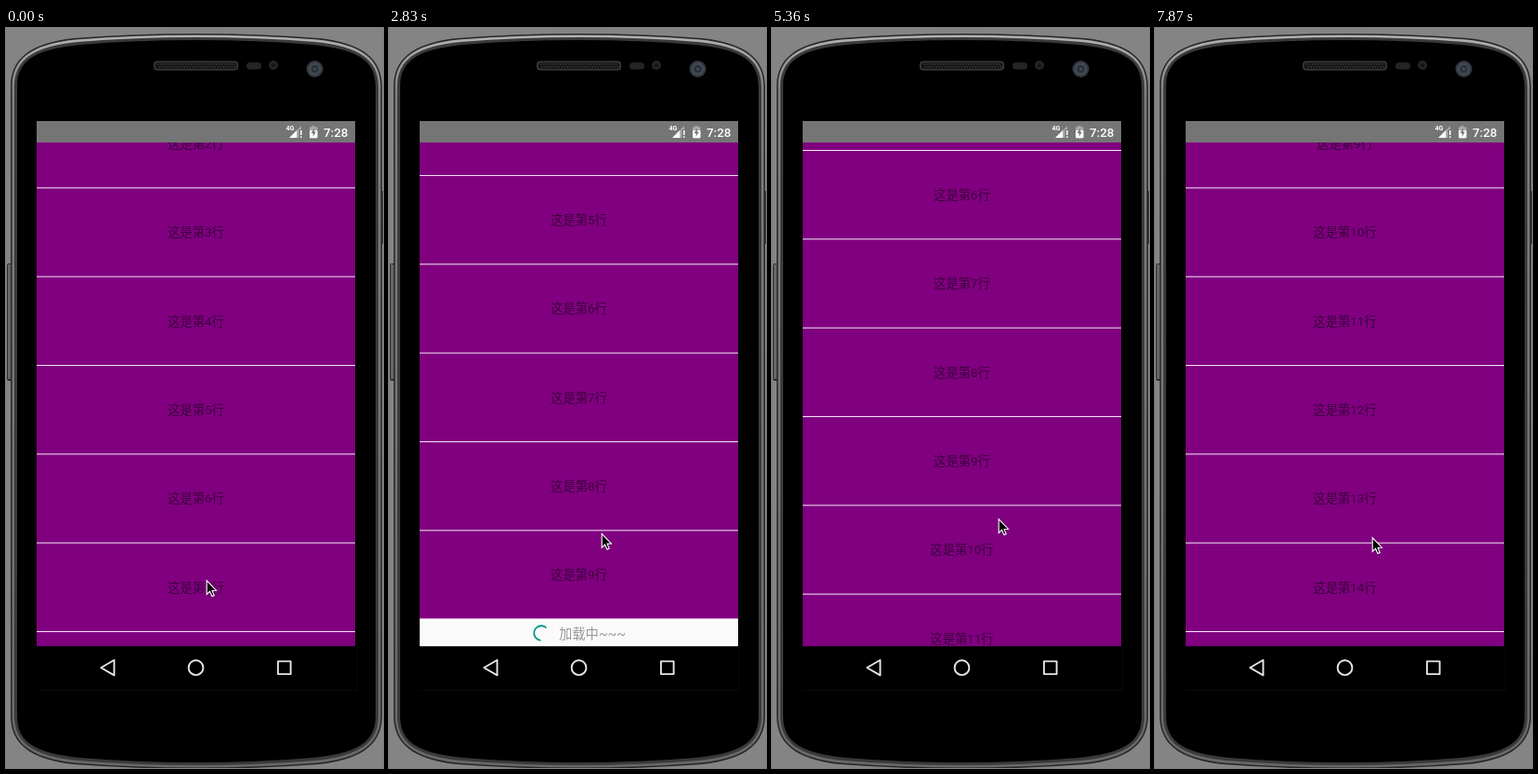
Recreate the animation shown at these times as an HTML page with a canvas. Size 406 px wide and 795 px high, loop 8000 ms.

```html
<!DOCTYPE html>
<html lang="zh">
<head>
<meta charset="utf-8">
<title>List</title>
<style>
html, body { margin: 0; width: 100%; height: 100%; overflow: hidden; background: #848484; }
canvas { display: block; width: 406px; height: 795px; }
</style>
</head>
<body>
<canvas id="stage" width="406" height="795"></canvas>
<script>
const ctx = document.getElementById('stage').getContext('2d');
const LOOP = 8000, TICK = 148.3;
const ROW = 286 / 3, FIRST_LINE = 171.3;
const LOADING = 8, LOADED = 25;
const FONT = 'Roboto, "Noto Sans CJK SC", "Noto Sans CJK", sans-serif';

// Each pointer move eases out; swipes also scroll the list.
const MOVES = [
  { at: 1, ticks: 3, dx: 10, dy: -143, scroll: 150 },
  { at: 4, ticks: 1, dx: 2, dy: 110 },
  { at: 6, ticks: 2, dx: 1, dy: -84, scroll: 54 },
  { at: 8, ticks: 6, dy: 48 },
  { at: 14, ticks: 11, dy: 24 },
  { at: 26, ticks: 2, dy: 34 },
  { at: 29, ticks: 3, dy: -147, scroll: 120.5 },
  { at: 32, ticks: 2, dx: 15, dy: 100 },
  { at: 35, ticks: 1, dy: -8, scroll: 1.8 },
  { at: 36, ticks: 3, dx: -6, dy: -90, scroll: 130.7 },
  { at: 39, ticks: 3, dx: -4, dy: 108 },
  { at: 43, ticks: 2, dy: 70 },
  { at: 46, ticks: 4, dy: -175, scroll: 210.3 },
  { at: 50, ticks: 3, dy: 107 }
];

const clamp = u => Math.max(0, Math.min(1, u));
const easeOut = u => 1 - (1 - u) ** 2.5;
const easeArc = u => 1 - (1 - u * u) ** 5;

function pose(k) {
  const p = { x: 216, y: 593, scroll: 0 };
  for (const { at, ticks, dx = 0, dy = 0, scroll = 0 } of MOVES) {
    const e = easeOut(clamp((k - at) / ticks));
    p.x += dx * e;
    p.y += dy * e;
    p.scroll += scroll * e;
  }
  return p;
}

function rect(color, x, y, w, h) {
  ctx.fillStyle = color;
  ctx.fillRect(x, y, w, h);
}

function pill(color, x, y, w, h, r) {
  ctx.fillStyle = color;
  ctx.beginPath();
  ctx.roundRect(x, y, w, h, r);
  ctx.fill();
}

function disc(color, x, y, r) {
  ctx.fillStyle = color;
  ctx.beginPath();
  ctx.arc(x, y, r, 0, 7);
  ctx.fill();
}

function poly(...pts) {
  ctx.beginPath();
  for (let i = 0; i < pts.length; i += 2) ctx.lineTo(pts[i], pts[i + 1]);
  ctx.closePath();
}

function clipTo(x, y, w, h) {
  ctx.save();
  ctx.beginPath();
  ctx.rect(x, y, w, h);
  ctx.clip();
}

function text(str, x, y, size, color, align = 'left', weight = 400) {
  ctx.font = `${weight} ${size}px ${FONT}`;
  ctx.textAlign = align;
  ctx.fillStyle = color;
  ctx.fillText(str, x, y);
}

// One corner mirrored into all four quadrants.
function shell(inset, color) {
  const w = 200 - inset, h = 395 - inset;
  const corner = new Path2D();
  corner.moveTo(0, 0);
  corner.lineTo(w, 0);
  corner.lineTo(w, 338);
  corner.bezierCurveTo(w, 367, w - 20, h - 10, w - 68, h - 5);
  corner.quadraticCurveTo(66, h, 0, h);
  corner.closePath();
  const path = new Path2D();
  for (const sx of [-1, 1])
    for (const sy of [-1, 1]) path.addPath(corner, new DOMMatrix([sx, 0, 0, sy, 205, 401]));
  ctx.fillStyle = color;
  ctx.fill(path);
}

function drawPhone() {
  rect('#848484', 0, 0, 406, 795);
  pill('#2a2a2a', 1, 253, 8, 126, 2);
  rect('#686868', 2, 254, 3, 123);
  pill('#333', 402, 175, 8, 57, 2);

  const rim = ctx.createLinearGradient(0, 6, 0, 795);
  rim.addColorStop(0, '#b4b4b4');
  rim.addColorStop(0.08, '#808080');
  rim.addColorStop(1, '#686868');
  shell(0, '#262626');
  shell(1.5, rim);
  shell(4, '#3a3a3a');
  shell(7, '#000');

  pill('#3c3c3c', 159, 35.5, 91, 10, 4);
  pill('#151515', 160.5, 37, 88, 7, 3);
  for (let x = 163; x < 247; x += 3) {
    rect('#3c3c3c', x, 38, 1.5, 1.5);
    rect('#3c3c3c', x + 1.5, 41, 1.5, 1.5);
  }
  pill('#242424', 259, 37, 16, 7.5, 3.5);
  disc('#242424', 288, 40, 5);
  disc('#141414', 288, 40, 2);
  disc('#33373d', 332.5, 44, 9);
  disc('#414851', 332.5, 44, 7);
  disc('#2a3038', 332.5, 44, 4);
  disc('#465060', 332.5, 44, 1.5);
}

function drawBars() {
  rect('#757575', 33, 100, 343, 23);
  text('4G', 301.5, 110, 7, '#fff', 'left', 700);
  ctx.fillStyle = '#fff';
  poly(305, 118, 313.5, 109.5, 313.5, 118);
  ctx.fill();
  ctx.fillStyle = '#aaa';
  poly(313.5, 109.5, 318, 105, 318, 109, 315.5, 109, 315.5, 118, 313.5, 118);
  ctx.fill();
  rect('#fff', 317, 110, 1.5, 5);
  rect('#fff', 317, 116.3, 1.5, 1.7);

  rect('#aaa', 329.5, 105, 3, 2);
  pill('#aaa', 327, 106.2, 8.4, 12, 1);
  pill('#fff', 327, 110, 8.4, 8.2, 1);
  ctx.fillStyle = '#757575';
  poly(331.8, 107.5, 328.7, 113, 330.7, 113, 330.7, 116.8, 333.8, 111.4, 331.8, 111.4);
  ctx.fill();
  text('7:28', 368.3, 117, 13.35, '#fff', 'right', 500);

  rect('#0b0b0b', 33, 664.6, 345, 47.4);
  rect('#000', 33, 664.6, 344, 46.4);
  ctx.strokeStyle = '#e6e6e6';
  ctx.lineWidth = 1.9;
  ctx.lineJoin = 'round';
  poly(102.3, 687.2, 116.5, 679, 116.5, 695.4);
  ctx.stroke();
  ctx.beginPath();
  ctx.arc(204.5, 687.2, 7.9, 0, 7);
  ctx.stroke();
  ctx.strokeRect(292.9, 680.4, 13.7, 13.7);
}

function drawSpinner(y, ms) {
  const u = ms / 1333 % 1;
  const turn = ms * 0.095 + u * 90 - 90;
  const start = turn + 270 * easeArc(clamp(u * 2 - 1));
  const end = Math.max(start + 10, turn + 270 * easeArc(clamp(u * 2)));
  const rad = Math.PI / 180;
  ctx.strokeStyle = '#009688';
  ctx.lineWidth = 1.8;
  ctx.beginPath();
  ctx.arc(164, y, 7.8, start * rad, end * rad);
  ctx.stroke();
}

function drawGlow(k) {
  const power = k < LOADING ? 0 : 1 - (k - LOADING) / 3;
  if (power <= 0) return;
  const r = 641 / power;
  clipTo(33, 560, 343, 74.6);
  disc(`rgba(255,255,255,${0.1 * power})`, 215, 635 - 19 * power + r, r);
  ctx.restore();
}

function drawList(k, scroll) {
  const lineY = n => FIRST_LINE + (n - 2) * ROW - scroll;
  clipTo(33, 123, 343, 541.6);
  rect('#800080', 33, 123, 343, 542);
  const last = k < LOADED ? 9 : 20;
  for (let n = 1; n <= last; n++) {
    text(`这是第${n}行`, 204.5, lineY(n) - 42.2, 13.35, 'rgba(0,0,0,.54)', 'center');
    rect('#f4eaf4', 33, lineY(n), 343, 1);
  }
  if (k < LOADED) {
    const y = lineY(9);
    rect('#fafafa', 33, y, 343, 31);
    text('加载中~~~', 183, y + 21, 14.3, '#999');
    if (k >= LOADING) drawSpinner(y + 15.4, 50 + (k - LOADING) * 149);
  }
  drawGlow(k);
  ctx.restore();
}

function drawPointer(x, y) {
  ctx.save();
  ctx.translate(x + 0.2, y + 0.6);
  poly(0, 0, 0, 14.8, 3.3, 11.7, 5.7, 17, 8, 16, 5.8, 10.8, 10.2, 10.6);
  ctx.shadowColor = 'rgba(0,0,0,.4)';
  ctx.shadowBlur = 2;
  ctx.shadowOffsetY = 1;
  ctx.fillStyle = '#000';
  ctx.fill();
  ctx.shadowColor = 'transparent';
  ctx.strokeStyle = '#fff';
  ctx.lineWidth = 1.1;
  ctx.lineJoin = 'miter';
  ctx.stroke();
  ctx.restore();
}

function render() {
  const t = performance.now() % LOOP;
  const k = Math.max(0, Math.floor((t - 3) / TICK));
  const { x, y, scroll } = pose(k);
  drawPhone();
  drawList(k, scroll);
  drawBars();
  drawPointer(x, y);
  requestAnimationFrame(render);
}
render();
</script>
</body>
</html>
```
